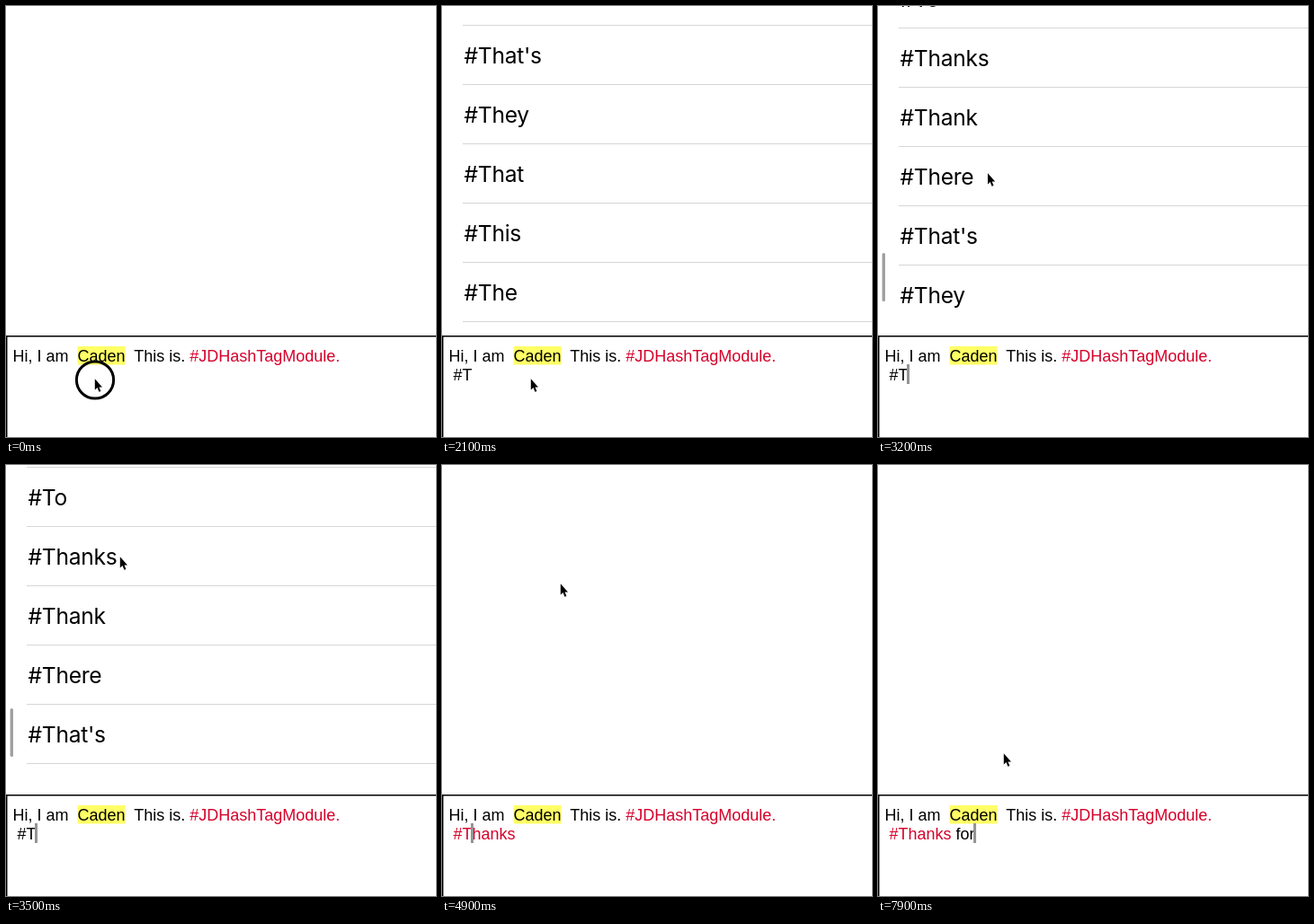
Recreate the animation shown at these times as an HTML page. Size 478 by 480 pixels, loop 8 s.

```html
<!DOCTYPE html>
<html lang="en">
<head>
<meta charset="utf-8">
<title>Hashtag suggestions</title>
<style>
  html, body { margin: 0; width: 100%; height: 100%; overflow: hidden; background: #fff; }
  svg { display: block; }
  text { white-space: pre; }
  .note { font: 18px "Liberation Sans", Arial, sans-serif; }
  .row { font: 24.6px Inter, sans-serif; letter-spacing: -.3px; }
  .red { fill: #d6002a; }
</style>
</head>
<body>
<svg width="478" height="480" viewBox="0 0 478 480">
  <clipPath id="listArea"><rect width="478" height="352"/></clipPath>
  <g id="list" clip-path="url(#listArea)">
    <g id="rows"></g>
    <rect id="thumb" x="4.6" width="3.4" height="54" rx="1.7" fill="#a0a0a0"/>
  </g>
  <path d="M0 367H478V368.6H1.5V480H0Z"/>
  <rect x="79.5" y="379" width="53" height="20.5" fill="#ffff66"/>
  <text class="note" x="7.5" y="396">Hi, I am  Caden  This is. <tspan class="red">#JDHashTagModule.</tspan></text>
  <text class="note" id="line" x="7.5" y="417"><tspan id="tag"></tspan><tspan id="rest"></tspan></text>
  <rect id="caret" y="399" width="3" height="22" fill="#949494"/>
  <g id="pointer">
    <circle id="ring" cx="1" cy="2.5" r="20.6" fill="none" stroke="#000" stroke-width="3"/>
    <path d="M.8 1.2V13.6L3.5 11.1 5.4 15.8 7.4 14.9 5.5 10.4H9Z" stroke="#fff" stroke-width="1.6" paint-order="stroke"/>
  </g>
</svg>
<script>
const LOOP = 8000, STEP = 100, ROW = 66, LIST_END = 351;
const LIST_OPENS = 1500, TAG_CHOSEN = 4800;
const TYPED = " #Thanks for", TAG_LENGTH = 8;
const $ = id => document.getElementById(id);
const words = ["The", "This", "That", "They", "That's", "There", "Thank", "Thanks", "To", "These"];

// [start, end, x, y]: straight moves from wherever the pointer rests.
const moves = [
  [2300, 2600, 115, 118], [2600, 3000, 118, 241], [3000, 3500, 126, 101],
  [3500, 3600, 127, 70], [3600, 3900, 130, 110], [4300, 4400, 131, 131], [5100, 5400, 139, 320]
];
// Spans of [on, start of fade-out].
const presses = [[0, 0], [2600, 3000], [3600, 4200], [4600, 4700]];
const caretOn = [[200, 800], [1400, 1700], [2500, 7300], [7700, LOOP]];
// The caret moves one letter forward at each of these times.
const caretSteps = [400, 1400, 5700, 6100, 6300, 6300, 6400, 6800, 7700, 7700, 7900];

const clamp = v => Math.min(1, Math.max(0, v));
const progress = (t, from, to) => clamp((t - from) / (to - from));
const easeOut = p => 1 - (1 - p) ** 2;

function glow(spans, t, fade) {
  const span = spans.filter(([on]) => on <= t).pop();
  return span ? clamp(1 - (t - span[1]) / fade) : 0;
}

// Two drags, with the momentum of the first between them.
const scrollAt = t => 123 * progress(t, 2600, 3000)
  + 122 * easeOut(progress(t, 3000, 3500))
  + 40 * progress(t, 3600, 3900);

function pointerAt(t) {
  return moves.reduce(([px, py], [from, to, x, y]) => {
    const p = progress(t, from, to);
    return [px + (x - px) * p, py + (y - py) * p];
  }, [98, 414]);
}

$("rows").innerHTML = words.map((word, i) => {
  const y = LIST_END - i * ROW;
  return `<text class="row" x="24.6" y="${y - 23.2}">#${word}</text>` +
    `<rect x="23" y="${y}" width="455" height="1" fill="#d6d6d6"/>`;
}).join("");

function draw(t) {
  const scroll = scrollAt(t);
  const chosen = t >= TAG_CHOSEN;
  $("list").style.display = t >= LIST_OPENS && !chosen ? "" : "none";
  $("rows").setAttribute("transform", `translate(0 ${Math.round(scroll)})`);
  $("thumb").setAttribute("y", 294 - scroll * 0.094);
  $("thumb").setAttribute("opacity", glow([[2600, 4200]], t, 400));
  $("pointer").setAttribute("transform", `translate(${pointerAt(t)})`);
  $("ring").setAttribute("opacity", glow(presses, t, 100));

  const index = 1 + caretSteps.filter(time => time <= t).length;
  const text = TYPED.slice(0, chosen ? Math.max(TAG_LENGTH, index) : index);
  $("tag").textContent = text.slice(0, TAG_LENGTH);
  $("rest").textContent = text.slice(TAG_LENGTH);
  $("tag").setAttribute("class", chosen ? "red" : "");
  $("caret").setAttribute("x", 6 + $("line").getSubStringLength(0, index));
  $("caret").setAttribute("opacity", glow(caretOn, t, 200));
}

const start = performance.now();
function tick() {
  const t = (performance.now() - start) % LOOP;
  draw(Math.floor(t / STEP) * STEP);
  requestAnimationFrame(tick);
}
tick();
</script>
</body>
</html>
```
